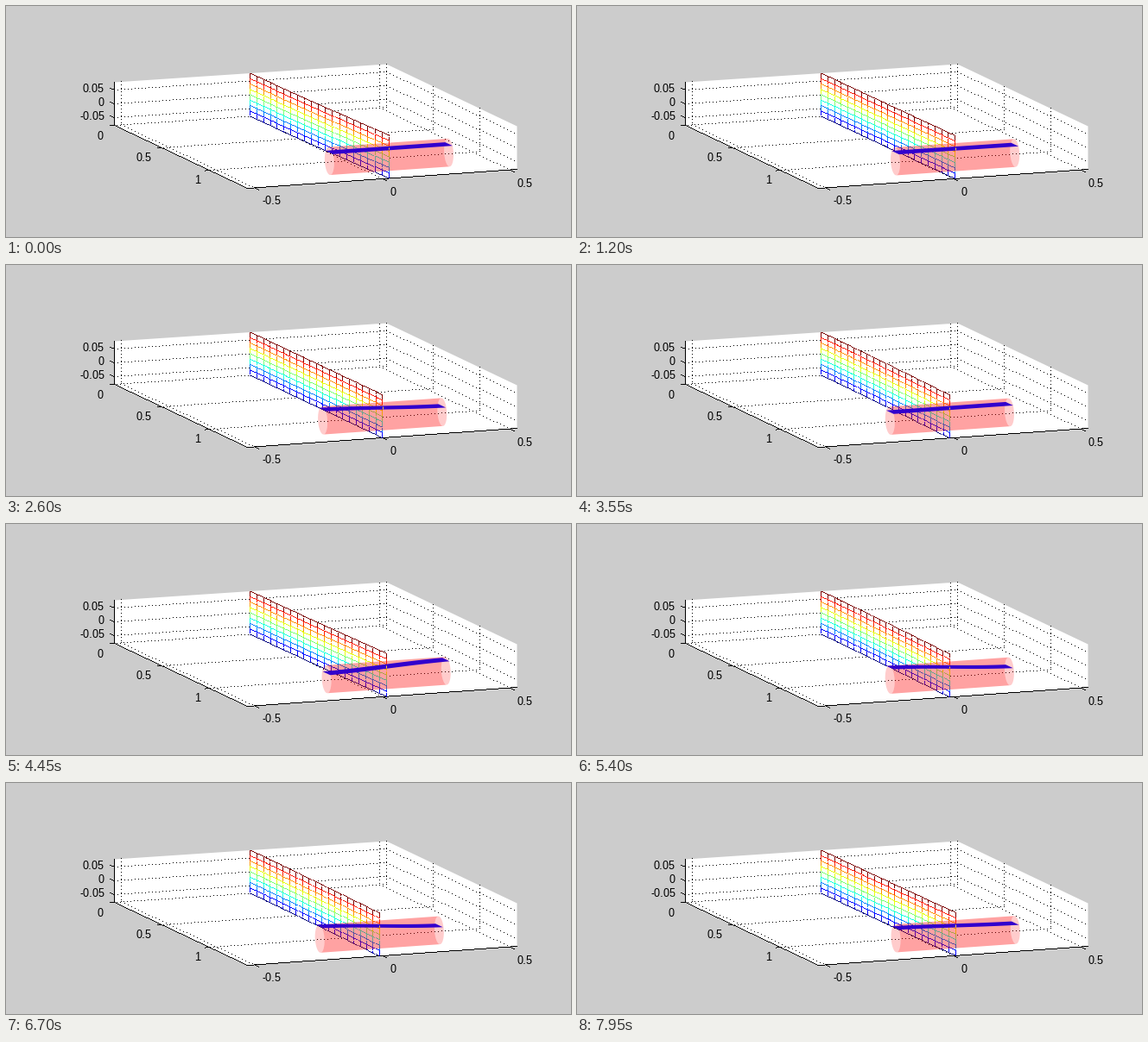
A matplotlib script that plays this animation: 654 px wide and 268 px high, repeating every 8 s.

```python
import numpy as np
import matplotlib
import matplotlib.pyplot as plt
from matplotlib.animation import FuncAnimation
from matplotlib.patches import Polygon

W, H, DPI = 654, 268, 64
PX = 72 / DPI                      # one pixel in points
FRAMES, STEP = 160, 50

# floor corners on screen: back left, back right, front right, front left
BL, BR, FR, FL = map(np.array, ((125, 138), (440, 117), (591, 189), (279, 211)))
X_MAX, Y_MAX, Z_MAX = 0.528, 1.4, 0.078
Z_PX = 25 / Z_MAX
X_PX = 297

# tank and liquid
RADIUS, HALF_LEN, LEVEL = 0.05, 0.234, 0.031
CHORD = np.sqrt(RADIUS**2 - LEVEL**2)
PERIODS = 1.52, 0.665
ROWS, COLS = 8, 20
BLACK = (0, 0, 0, 255)


def project(x, y, z):
    """Screen points of (broadcast) space coordinates."""
    x, y, z = np.broadcast_arrays(x, y, z)
    u = ((x + X_MAX) / (2 * X_MAX))[..., None]
    v = (y / Y_MAX)[..., None]
    p = (1 - v) * ((1 - u) * BL + u * BR) + v * ((1 - u) * FL + u * FR)
    p[..., 1] -= (z + Z_MAX) * Z_PX
    return p


def stroke(img, p, q, color=BLACK, pitch=1):
    """One pixel wide hard-edged line; a pitch above 1 makes it dotted."""
    p, q = np.asarray(p, float), np.asarray(q, float)
    n = int(round(np.abs(q - p).max()))
    t = np.linspace(0, 1, n + 1)[::pitch, None]
    x, y = np.rint(p + (q - p) * t).astype(int).T
    img[y, x] = color


matplotlib.rcParams["text.hinting"] = "native"
matplotlib.rcParams["text.hinting_factor"] = 1
fig = plt.figure(figsize=(W / DPI, H / DPI), dpi=DPI, facecolor="#cccccc")
ax = fig.add_axes([0, 0, 1, 1])


def layer(img, zorder):
    return ax.imshow(img, extent=(-0.5, W - 0.5, H - 0.5, -0.5), aspect="auto",
                     interpolation="nearest", zorder=zorder)


def dotted(*corners):
    pts = [project(*c) for c in corners]
    for p, q in zip(pts, pts[1:]):
        stroke(base, p, q, pitch=4)


def tick(x, y, z, step):
    p = project(x, y, z)
    stroke(base, p, p + step)


def label(x, y, s, ha="center"):
    ax.text(x, y, s, ha=ha, va="center_baseline", family="Liberation Sans",
            fontsize=13.33 * PX, color="black")


# white box walls and floor
up = np.array([0, 50])
ax.add_patch(Polygon([BL - up, BR - up, FR - up, FR, FL, BL], fc="white",
                     ec="none", zorder=0))

base = np.zeros((H, W, 4), np.uint8)
for x in (-0.5, 0, 0.5):
    dotted((x, 0, Z_MAX), (x, 0, -Z_MAX), (x, Y_MAX, -Z_MAX))
    tick(x, Y_MAX, -Z_MAX, (5, 2.4))
for y in (0, 0.5, 1):
    dotted((X_MAX, y, Z_MAX), (X_MAX, y, -Z_MAX), (-X_MAX, y, -Z_MAX))
    tick(-X_MAX, y, -Z_MAX, (-5, 0.4))
for z in (-0.05, 0, 0.05):
    dotted((-X_MAX, 0, z), (X_MAX, 0, z), (X_MAX, Y_MAX, z))
    tick(-X_MAX, 0, z, (-5, -2.4))
for p, q in ((BL - up, BL), (BL, FL), (FL, FR)):
    stroke(base, p, q)
layer(base, 1)

for s, y in (("0.05", 94.5), ("0", 110.5), ("-0.05", 126.5)):
    label(113.5, y, s, "right")
label(109, 149.5, "0")
label(159.5, 174.5, "0.5")
label(221.5, 201, "1")
label(307, 224.5, "-0.5")
label(447.5, 214, "0")
label(600.5, 204, "0.5")

# moving parts
colors = matplotlib.colormaps["jet"](np.arange(ROWS + 1) / ROWS, bytes=True)
face = Polygon(np.zeros((3, 2)), fc="white", ec="none", zorder=3)
caps = [Polygon(np.zeros((3, 2)), fc="red", alpha=0.2, ec="none", zorder=5)
        for _ in range(2)]
body = Polygon(np.zeros((3, 2)), fc="red", alpha=0.365, ec="none", zorder=5)
liquid = Polygon(np.zeros((3, 2)), fc="#3200cd", ec="none", zorder=6)
for patch in (face, *caps, body, liquid):
    ax.add_patch(patch)
mesh = layer(np.zeros_like(base), 4)
spot, = ax.plot([], [], color="#ffc83c", lw=PX, zorder=7,
                solid_capstyle="butt")
ax.set_xlim(-0.5, W - 0.5)
ax.set_ylim(H - 0.5, -0.5)
ax.axis("off")

s = np.linspace(0, 1, COLS + 1)
bend = 1.5 * s**2 - 0.5 * s**3          # tip-loaded cantilever
levels = np.linspace(-Z_MAX, Z_MAX, ROWS + 1)
xi = np.linspace(-1, 1, 31)
wave = 0.5 * (xi + np.sin(np.pi / 2 * xi))


def rim(x, start, stop):
    a = np.radians(np.linspace(start, stop, 40))
    return project(x, Y_MAX + RADIUS * np.cos(a), RADIUS * np.sin(a))


def draw_mesh(grid):
    img = np.zeros_like(base)
    for i in range(ROWS):
        for p, q in zip(grid[i], grid[i + 1]):
            stroke(img, p, q, colors[i + 1])
    for row, color in zip(grid, colors):
        for p, q in zip(row, row[1:]):
            stroke(img, p, q, color)
    return img


def draw(frame):
    t = frame * STEP / 1000
    slow, fast = (np.cos(2 * np.pi * t / p) for p in PERIODS)
    tip = (6 * slow + 2 * fast) / X_PX
    slosh = 2.5 * (slow - fast) / Z_PX

    grid = project(tip * bend[None, :], Y_MAX * s[None, :], levels[:, None])
    face.set_xy([*grid[0], *grid[-1][::-1]])
    mesh.set_data(draw_mesh(grid))

    left, right = tip - HALF_LEN, tip + HALF_LEN
    for cap, x in zip(caps, (left, right)):
        cap.set_xy(rim(x, 0, 360))
    body.set_xy(np.vstack([rim(left, 100.5, -79.5), rim(right, -79.5, -259.5)]))

    x = tip + HALF_LEN * xi
    z = LEVEL + slosh * wave
    back = project(x, Y_MAX - CHORD, z)
    front = project(x, Y_MAX + CHORD, z)
    liquid.set_xy(np.vstack([back, front[::-1]]))

    p = project(np.full(2, tip), Y_MAX, LEVEL + np.array([-0.004, 0.004]))
    spot.set_data(p[:, 0], p[:, 1])
    return face, mesh, *caps, body, liquid, spot


anim = FuncAnimation(fig, draw, frames=FRAMES, interval=STEP, repeat=True,
                     repeat_delay=0, blit=False)
plt.show()
```
